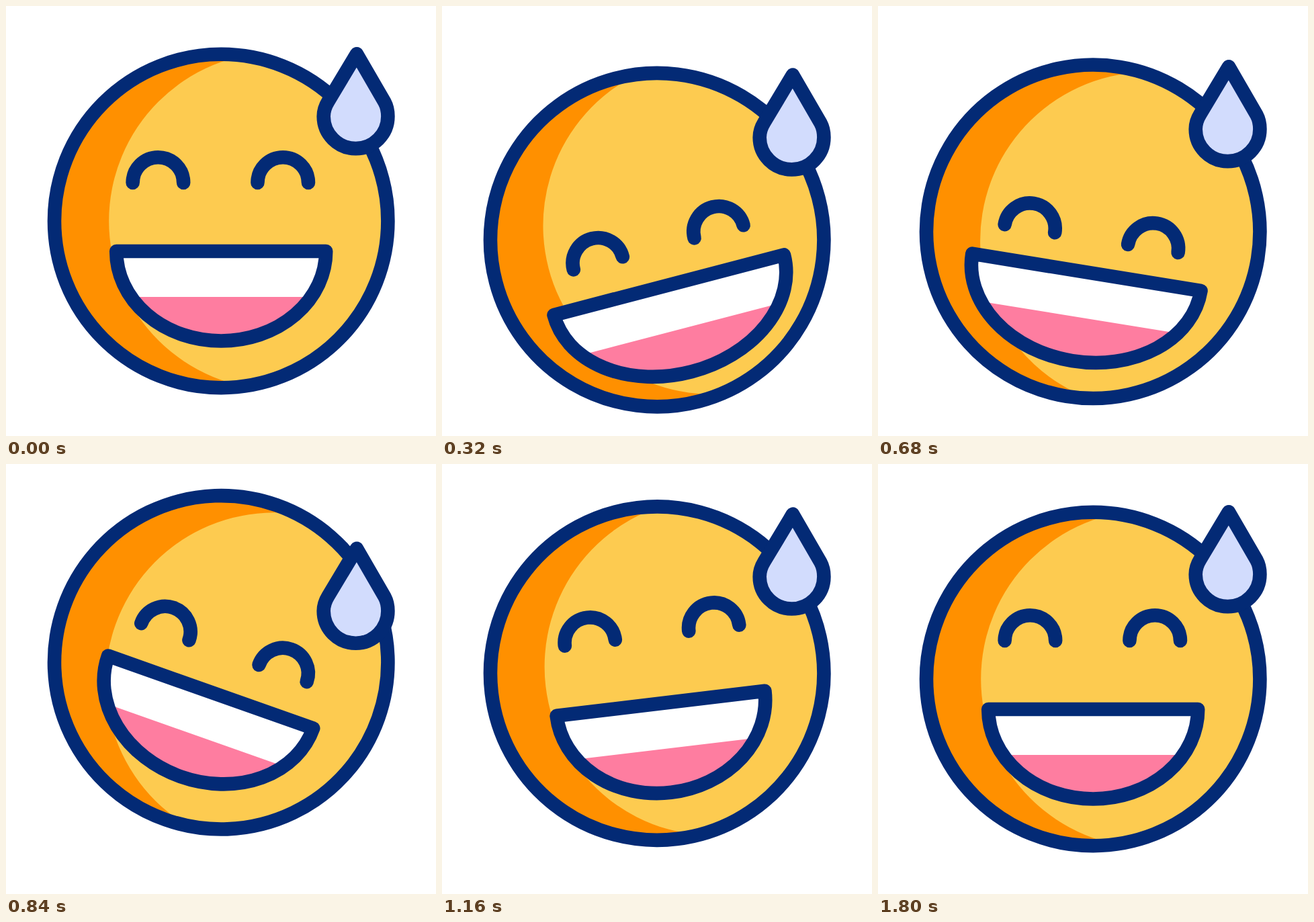
These frames come from a looping animation (640x640 px, 2000 ms). An HTML page:

```html
<!DOCTYPE html>
<html lang="en">
<head>
<meta charset="utf-8">
<title>Nervous laugh</title>
<style>
  html, body { margin: 0; width: 100%; height: 100%; overflow: hidden; background: #fff; }
  svg { display: block; width: 100vw; height: 100vh; }
  .line { fill: none; stroke: #032a75; stroke-width: 20.6; stroke-linecap: round; stroke-linejoin: round; }
</style>
</head>
<body>
<svg viewBox="0 0 640 640">
  <defs>
    <clipPath id="disc"><circle r="248"/></clipPath>
    <clipPath id="mouthClip"><path class="lips"/></clipPath>
    <path id="eye" d="M-37.75 0a37.75 37.75 0 0 1 75.5 0"/>
  </defs>
  <g id="head">
    <circle r="248" fill="#ff9000"/>
    <circle cx="84" r="251" fill="#fdcb50" clip-path="url(#disc)"/>
    <circle class="line" r="248.2"/>
    <g id="eyes" class="line">
      <use href="#eye" x="-93.8" y="-57"/>
      <use href="#eye" x="92" y="-57"/>
    </g>
    <g id="mouth">
      <path class="lips" fill="#fff"/>
      <rect x="-200" y="113" width="400" height="80" fill="#fe7da0" clip-path="url(#mouthClip)"/>
      <path class="lips line"/>
    </g>
  </g>
  <g id="drop">
    <path class="line" style="fill:#d2dcfd" d="M522 71.3L563.5 143Q568.4 152 568.4 164.3A47.85 47.85 0 0 1 472.7 164.3Q472.7 153 479.5 142Z"/>
  </g>
</svg>
<script>
const LOOP = 2000, STEP = 40, REST = 1800;

// Smooth rise from 0 to 1 between times a and b.
function rise(t, a, b) {
  const p = Math.min(1, Math.max(0, (t - a) / (b - a)));
  return p * p * (3 - 2 * p);
}
// Up between a and b, back down between c and d.
const hold = (t, a, b, c, d) => rise(t, a, b) - rise(t, c, d);
const hump = (t, a, peak, b) => hold(t, a, peak, peak, b);

// Squat, then jump.
const headY = t => 42 * hump(t, 0, 520, 920) - 32.4 * hump(t, 520, 920, 1280);

// A swing that dies away.
const tilt = t => -14.8 * hump(t, 0, 340, 880) + 20 * hump(t, 340, 880, 1200)
  - 8 * hump(t, 880, 1200, 1500) + 2.4 * hump(t, 1200, 1500, 1800);

// The drop falls twice, then slips a little.
const dropY = t => 60 * hump(t, 0, 200, 480) - 13 * hump(t, 200, 480, 920)
  + 61 * hump(t, 480, 920, 1200) + 22 * hump(t, 1200, 1480, 1800);

const eyesY = t => 69 * hold(t, 0, 340, 640, 1105);
const mouthY = t => 24.5 * hold(t, 0, 340, 540, 900);
const mouthR = t => 156 + 21 * hold(t, 0, 300, 540, 1000);

const byId = id => document.getElementById(id);
const head = byId('head'), eyes = byId('eyes'), mouth = byId('mouth'), drop = byId('drop');
const lips = document.querySelectorAll('.lips');
const shiftY = (node, y) => node.setAttribute('transform', `translate(0 ${y})`);

function draw(t) {
  head.setAttribute('transform', `translate(320.2 ${320 + headY(t)}) rotate(${tilt(t)})`);
  shiftY(eyes, eyesY(t));
  shiftY(mouth, mouthY(t));
  shiftY(drop, dropY(t));
  const r = mouthR(t);
  const shape = `M${-r} 45H${r}A${r} 133.5 0 0 1 ${-r} 45Z`;
  lips.forEach(path => path.setAttribute('d', shape));
}

const start = performance.now();
function tick() {
  const t = (performance.now() - start) % LOOP;
  draw(Math.min(REST, Math.floor((t + 1) / STEP) * STEP));
  requestAnimationFrame(tick);
}
tick();
</script>
</body>
</html>
```
